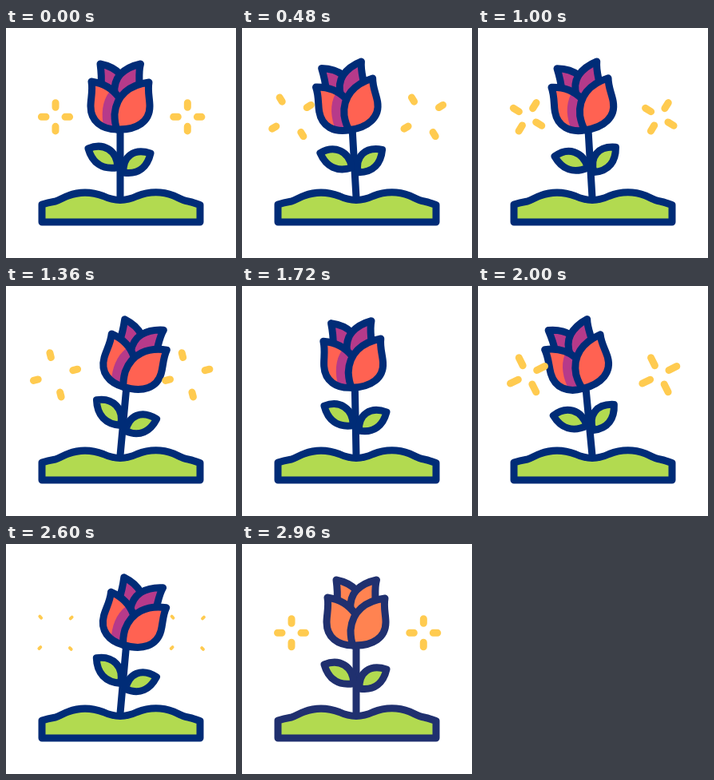
An HTML page for the animation above (3000 ms loop, 288 by 288 pixels).

```html
<!DOCTYPE html>
<html lang="en">
<head>
<meta charset="utf-8">
<title>Swaying flower</title>
<style>
  html, body { margin: 0; height: 100%; overflow: hidden; background: #fff; }
  svg { display: block; width: 100%; height: 100%; --ink: #002c77; --red: #ff6252; --plum: #b63a8a; }
  svg.warm { --ink: #20306f; --red: #ff8351; --plum: #ff8351; }
  .line { stroke: var(--ink); stroke-width: 9; stroke-linecap: round; stroke-linejoin: round; }
  .green { fill: #b2da50; }
  .red { fill: var(--red); }
  .plum { fill: var(--plum); }
  .star { stroke: #ffcb50; stroke-linecap: round; }
</style>
</head>
<body>
<svg id="scene" viewBox="0 0 288 288" fill="none">
  <g id="plant">
    <path class="line" d="M143 212V128"/>
    <path id="leafL" class="line green" d="M103 151C122 143 139 153 140 174.500C121 178 108 169 103 151Z"/>
    <path id="leafR" class="line green" d="M147 181C146 161 160 150 181 157C177 174 166 184 147 181Z"/>
    <g id="head">
      <path class="line plum" d="M119 72C120 62 119 53 118 45C128 47 137 51 143 58C150 51 159 47 168.500 45C166 54 167 62 167 72L143 90Z"/>
      <path class="line" d="M143 58C137 65 135 72 136 82"/>
      <path class="red" d="M107 67C121 69 134 76 142 88L139 127C120 127 106 117 106 98C106 88 109 79 107 67Z"/>
      <path class="plum" d="M130 79C120 92 119 108 122.500 125L139 127L142 88Z"/>
      <path class="line" d="M142 88C134 76 121 69 107 67C109 79 106 88 106 98C106 117 120 127 139 127"/>
      <path class="line red" d="M179 68C155 71 138 84 136 108C136 116 137 122 139 127C164 128 180 117 180 98C180 88 177 79 179 68Z"/>
    </g>
  </g>
  <path class="line green" d="M45 243V221C51 219 56 218 62 217C68 215 72 212 78 210C94 204 110 206 122 210.500C136 217 150 217 164 210.500C178 205 194 204 210 210C217 213 221 216 228 217C233 218 238 220 243 221.500V243Z"/>
  <path class="star" id="starL"/>
  <path class="star" id="starR"/>
</svg>
<script>
const LOOP = 3000, SPIN = 2960, BURST = 970;
const $ = id => document.getElementById(id);
const smooth = u => (1 - Math.cos(Math.PI * u)) / 2;
const linear = u => u;

// Keys are [time, ...values]; returns the eased values at time t.
function track(keys, t, ease) {
  const i = keys.findIndex(k => k[0] > t);
  if (i < 0) return keys.at(-1).slice(1);
  if (i === 0) return keys[0].slice(1);
  const a = keys[i - 1], b = keys[i];
  const u = ease((t - a[0]) / (b[0] - a[0]));
  return a.slice(1).map((v, j) => v + (b[j + 1] - v) * u);
}

const swayKeys = [[0, 0], [850, -16], [1375, 15.5], [1990, -16], [2120, -16], [2600, 15], [2860, 0]];
const sway = t => track(swayKeys, t, smooth)[0];

// Inner radius, outer radius and thickness of the sparkle dashes.
const burstKeys = [
  [0, 12, 17.5, 9], [60, 13, 24, 9], [220, 22.5, 28.5, 9], [610, 22.5, 28.5, 9],
  [700, 28.5, 28.5, 0], [770, 0, 0, 0], [BURST, 12, 17.5, 9]
];

function turn(id, angle, x, y) {
  $(id).setAttribute("transform", `rotate(${angle} ${x} ${y})`);
}

function drawStar(id, x, y, t) {
  const phase = t < 3 * BURST ? t % BURST : 0;
  const [inner, outer, width] = track(burstKeys, phase, linear);
  const star = $(id);
  star.setAttribute("d",
    `M0 ${-inner}V${-outer}M0 ${inner}V${outer}M${-inner} 0H${-outer}M${inner} 0H${outer}`);
  star.setAttribute("stroke-width", width);
  star.setAttribute("visibility", width > 0.1 ? "visible" : "hidden");
  star.setAttribute("transform", `translate(${x} ${y}) rotate(${t / SPIN * 360})`);
}

function draw(t) {
  const lean = sway(t), stem = 0.34 * lean;
  const leaf = sway(t - 60) - stem; // leaves trail the head
  turn("plant", stem, 143, 212);
  turn("head", lean - stem, 143, 128);
  turn("leafL", leaf, 140, 176);
  turn("leafR", leaf, 146, 181);
  drawStar("starL", 62, 111.3, t);
  drawStar("starR", 227.3, 111.3, t);
  $("scene").classList.toggle("warm", t >= 2960);
}

const start = performance.now();
function frame() {
  draw((performance.now() - start) % LOOP);
  requestAnimationFrame(frame);
}
frame();
</script>
</body>
</html>
```
